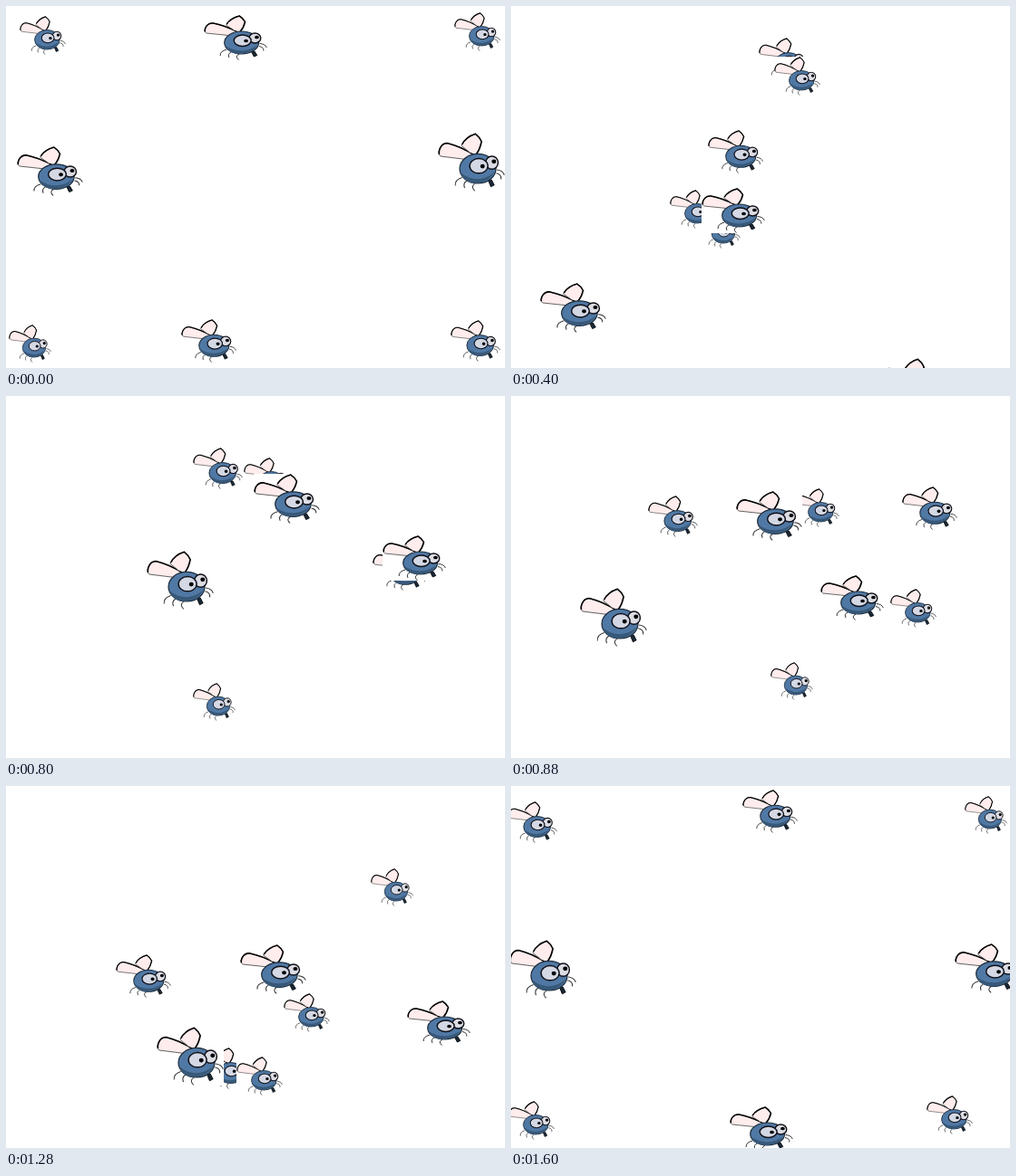
Write an HTML page with a canvas that moves like this. It is 550 px wide and 400 px high and loops after 1680 ms.

```html
<!DOCTYPE html>
<html lang="en">
<head>
<meta charset="utf-8">
<title>Flies</title>
<style>
html, body { margin: 0; width: 100%; height: 100%; overflow: hidden; background: #fff; }
canvas { display: block; }
</style>
</head>
<body>
<canvas id="stage" width="550" height="400"></canvas>
<script>
const ctx = document.getElementById('stage').getContext('2d');
const STEP = 80;
const STEPS = 21;
const KEYS = [0, 3, 7, 10, 13, 16, 20];

// Back to front: width, height, then the top left corner at each key step.
const flies = [
  { w: 47, h: 42, path: [[3, 352], [168, 223], [218, 256], [206, 317], [470, 210], [402, 91], [500, 11]] },
  { w: 55, h: 46, path: [[490, 347], [371, 61], [193, 51], [206, 57], [40, 241], [215, 289], [-4, 17]] },
  { w: 51, h: 43, path: [[15, 11], [218, 63], [344, 56], [425, 157], [367, 318], [254, 299], [458, 342]] },
  { w: 51, h: 43, path: [[494, 7], [259, 78], [141, 286], [262, 68], [388, 235], [306, 229], [-3, 348]] },
  { w: 61, h: 48, path: [[193, 346], [177, 143], [278, 160], [404, 167], [425, -34], [121, 186], [255, 4]] },
  { w: 70, h: 50, path: [[218, 10], [173, 141], [274, 231], [415, 154], [164, 312], [442, 237], [241, 354]] },
  { w: 73, h: 55, path: [[12, 155], [75, 185], [17, 380], [273, 86], [140, 219], [258, 175], [489, 174]] },
  { w: 74, h: 65, path: [[476, 140], [341, 374], [450, 346], [155, 171], [-16, 343], [166, 266], [-2, 170]] }
];

// Fly parts in a unit box.
const part = {
  leftWing: new Path2D('M.46 .46 L.04 .4 Q-.01 .35 .03 .27 Q.07 .17 .15 .18 Q.33 .23 .53 .37'),
  leftEdge: new Path2D('M.02 .37 Q.01 .33 .03 .27 Q.07 .17 .15 .18 Q.33 .23 .53 .37'),
  rightWing: new Path2D('M.47 .33 L.35 .22 Q.42 .07 .56 .02 Q.62 .07 .65 .15 Q.63 .28 .57 .37'),
  rightEdge: new Path2D('M.36 .2 Q.42 .07 .56 .02 Q.62 .07 .65 .15 Q.63 .28 .57 .37'),
  legs: new Path2D('M.36 .76 Q.25 .8 .26 .9 M.43 .82 Q.37 .86 .4 .94 M.56 .86 Q.48 .91 .55 .99 ' +
    'M.88 .63 Q.97 .64 .99 .72 M.87 .69 Q.95 .71 .94 .79'),
  snout: new Path2D('M.75 .81 L.8 .8 L.84 .89 L.79 .92 Z'),
  body: oval(.595, .61, .27, .25),
  shade: new Path2D('M.34 .68 C.4 .92 .73 .92 .84 .67 C.68 .83 .5 .82 .34 .68 Z'),
  bigEye: oval(.61, .565, .135, .125),
  smallEye: oval(.805, .51, .092, .11),
  pupils: join(oval(.665, .57, .034, .037), oval(.835, .49, .034, .037))
};

function oval(x, y, rx, ry) {
  const p = new Path2D();
  p.ellipse(x, y, rx, ry, 0, 0, 2 * Math.PI);
  return p;
}

function join(a, b) {
  const p = new Path2D(a);
  p.addPath(b);
  return p;
}

// Cubic through the key points, with tangents from the neighbouring keys.
function along(path, step) {
  let i = 0;
  while (i < KEYS.length - 2 && step >= KEYS[i + 1]) i++;
  const span = KEYS[i + 1] - KEYS[i];
  const u = (step - KEYS[i]) / span;
  const slope = (k, axis) => {
    const a = Math.max(k - 1, 0), b = Math.min(k + 1, KEYS.length - 1);
    return (path[b][axis] - path[a][axis]) / (KEYS[b] - KEYS[a]) * span;
  };
  return [0, 1].map(axis => {
    const p = path[i][axis], q = path[i + 1][axis];
    const m = slope(i, axis), n = slope(i + 1, axis);
    const d = q - p;
    return Math.round(p + u * (m + u * (3 * d - 2 * m - n + u * (m + n - 2 * d))));
  });
}

function drawFly({ w, h, path }, step) {
  const [x, y] = along(path, step);
  const box = new DOMMatrix([w, 0, 0, h, x, y]);
  const paint = (shape, fill, stroke, width = 1) => {
    const p = new Path2D();
    p.addPath(shape, box);
    if (fill) {
      ctx.fillStyle = fill;
      ctx.fill(p);
    }
    if (stroke) {
      ctx.strokeStyle = stroke;
      ctx.lineWidth = width * w / 70;
      ctx.stroke(p);
    }
  };

  // Each fly sits on an opaque white card that hides those behind it.
  ctx.fillStyle = '#fff';
  ctx.fillRect(x, y, w, h);

  paint(part.legs, null, '#333', 1);
  paint(part.leftWing, '#ffecec', '#444', .8);
  paint(part.leftEdge, null, '#000', 1.5);
  paint(part.rightWing, '#ffecec', '#444', .8);
  paint(part.rightEdge, null, '#000', 1.5);
  paint(part.snout, '#182838', '#000', .8);
  paint(part.body, '#5078a4', '#1c2c3c', 1.2);
  paint(part.shade, '#385878');
  paint(part.smallEye, '#dcdce4', '#101018', 1.4);
  paint(part.bigEye, '#d4d8e4', '#101018', 1.4);
  paint(part.pupils, '#000');
}

function draw() {
  const step = Math.floor(performance.now() / STEP) % STEPS;
  ctx.fillStyle = '#fff';
  ctx.fillRect(0, 0, 550, 400);
  for (const fly of flies) drawFly(fly, step);
  requestAnimationFrame(draw);
}

draw();
</script>
</body>
</html>
```
